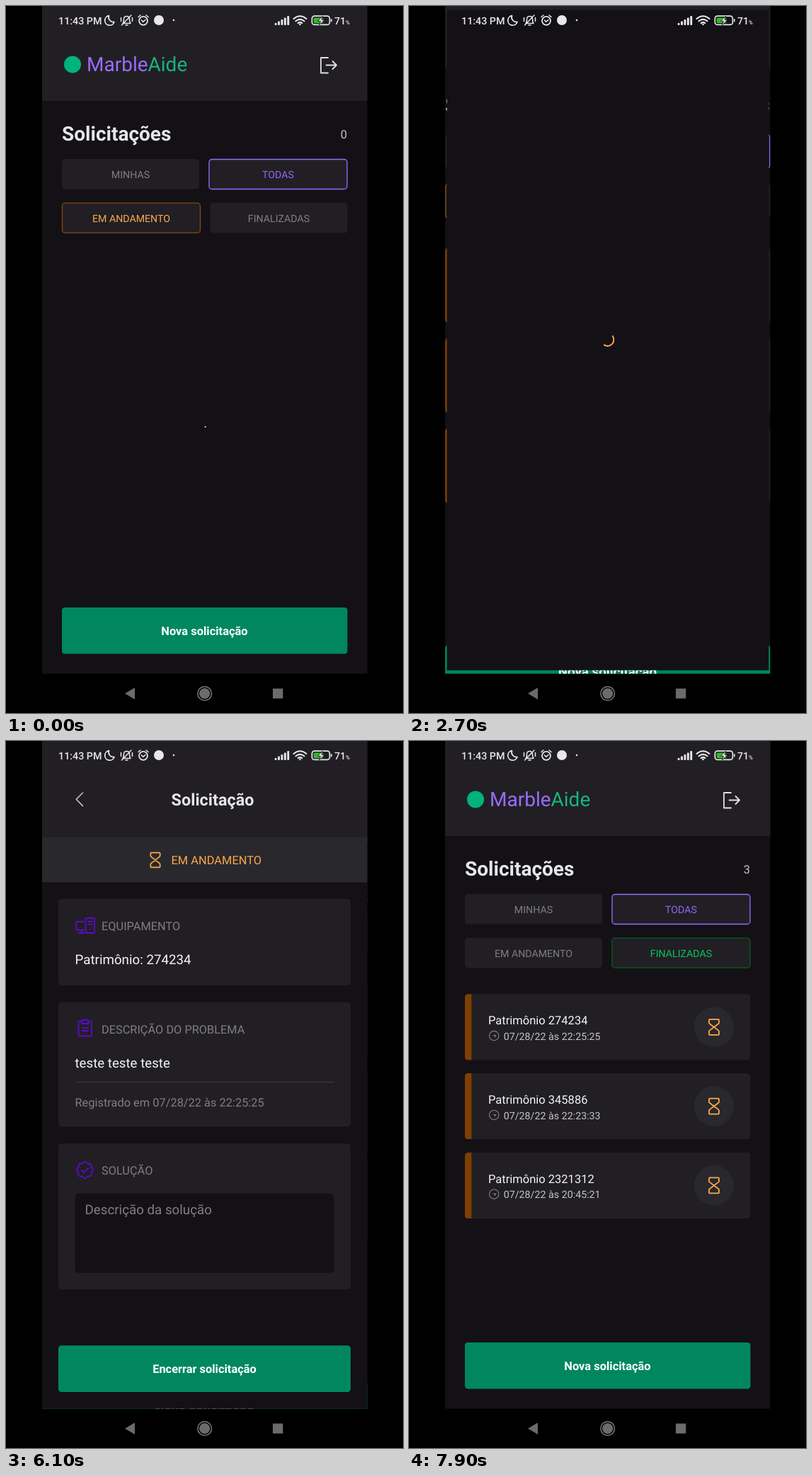
An HTML page for the animation above (8 s loop, 561 px wide and 998 px high).

```html
<!DOCTYPE html>
<html lang="pt-BR">
<head>
<meta charset="utf-8">
<title>Solicitações</title>
<style>
  html, body { margin: 0; width: 100%; height: 100%; overflow: hidden; background: #000; }
  svg { display: block; width: 100vw; height: 100vh; font-family: Roboto, sans-serif; text-rendering: geometricPrecision; }
  .line { fill: none; stroke-linecap: round; stroke-linejoin: round; }
  .bold { font-weight: 700; }
  .mid { text-anchor: middle; }
  .end { text-anchor: end; }
</style>
</head>
<body>
<svg viewBox="0 0 561 998" id="stage"></svg>
<script>
const BG = '#131115', PANEL = '#211f24', RAISED = '#29282d', GREEN = '#00875f',
  ORANGE = '#fba94c', RUST = '#803e02', GRAY = '#7f7e84', LIGHT = '#c4c4cc', WHITE = '#f4f4f6',
  VIOLET = '#996dff', PURPLE = '#5c0acb';

const rect = (x, y, w, h, fill, r = 4.5, more = '') =>
  `<rect x="${x}" y="${y}" width="${w}" height="${h}" rx="${r}" fill="${fill}" ${more}/>`;
const text = (x, y, size, fill, str, cls = '') =>
  `<text x="${x}" y="${y}" font-size="${size}" fill="${fill}" class="${cls}">${str}</text>`;
const line = (d, stroke, width, more = '') =>
  `<path class="line" d="${d}" stroke="${stroke}" stroke-width="${width}" ${more}/>`;
const disc = (x, y, r, fill, more = '') => `<circle cx="${x}" cy="${y}" r="${r}" fill="${fill}" ${more}/>`;
const ring = (x, y, r, stroke, width) => disc(x, y, r, 'none', `stroke="${stroke}" stroke-width="${width}"`);

const hourglass = (x, y, s = 1) =>
  line('M-6 -11H6Q7 -11 7 -10V-6.2Q7 -5.4 6.3 -4.8L-6.3 4.8Q-7 5.4 -7 6.2V10Q-7 11 -6 11H6Q7 11 7 10V6.2Q7 5.4 6.3 4.8L-6.3 -4.8Q-7 -5.4 -7 -6.2V-10Q-7 -11 -6 -11Z',
    ORANGE, 1.8, `transform="translate(${x} ${y}) scale(${s})"`);

const spinner = (id, y) => `<circle id="${id}" cx="280.5" cy="${y}" r="9" pathLength="1" fill="none"
  stroke="${ORANGE}" stroke-width="2" stroke-linecap="square"/>`;

// Selected filters are slightly wider because of their border.
function filter(column, y, label, border, color) {
  const x = column ? (border ? 286.5 : 288.5) : 79;
  const w = border ? 196 : 194;
  const box = border
    ? rect(x + .5, y + .5, w - 1, 42, PANEL, 4, `stroke="${border}" stroke-width="1.3"`)
    : rect(x, y, w, 42.5, PANEL);
  return box + text(x + w / 2, y + 26.8, 14.2, color || GRAY, label, 'mid');
}

function card(name, date, i) {
  return `<g transform="translate(0 ${357.3 + i * 111.8})">
    ${rect(79, 0, 403.5, 93, PANEL)}
    <path d="M88.3 0H83.5Q79 0 79 4.5V88.5Q79 93 83.5 93H88.3Z" fill="${RUST}"/>
    ${text(112, 42.8, 16.5, WHITE, 'Patrimônio ' + name)}
    ${ring(120.2, 58.8, 6.7, GRAY, 1.1)}
    <path d="M117.5 57.8h6l-2 3.6-1-2.4z" fill="${GRAY}"/>
    ${text(133.7, 64.6, 14.25, LIGHT, date)}
    ${disc(431, 46.5, 28.2, RAISED)}${hourglass(431, 46.5)}</g>`;
}

const home = rect(-20, -60, 600, 1100, BG, 0) + rect(51, 0, 460, 134, PANEL, 0) +
  disc(94, 82.5, 12, '#00b37e') +
  text(114, 91.5, 28, VIOLET, 'Marble<tspan fill="#18b47c">Aide</tspan>') +
  line('M455 73H445V94.5H455M452.5 83.5H467M461.5 78L467 83.5L461.5 89', '#e1e1e6', 1.8) +
  text(79, 190.4, 28, '#e6e6ea', 'Solicitações', 'bold') +
  `<text id="count" class="end" x="482" y="187" font-size="16.4" fill="${LIGHT}"></text>` +
  filter(0, 216, 'MINHAS') + filter(1, 216, 'TODAS', VIOLET, '#9167f2') +
  `<g id="open">${filter(0, 277.7, 'EM ANDAMENTO', '#8a4a10', ORANGE)}${filter(1, 277.7, 'FINALIZADAS')}</g>
   <g id="closed">${filter(0, 277.7, 'EM ANDAMENTO')}${filter(1, 277.7, 'FINALIZADAS', '#06601f', '#08c45c')}</g>
   <g id="list">${[
    ['274234', '07/28/22 às 22:25:25'],
    ['345886', '07/28/22 às 22:23:33'],
    ['2321312', '07/28/22 às 20:45:21']
  ].map((c, i) => card(...c, i)).join('')}</g>` +
  spinner('listSpin', 603) +
  rect(79, 849, 403.5, 65.5, GREEN) +
  text(280.5, 888, 16.45, '#fff', 'Nova solicitação', 'bold mid');

const seal = Array.from({ length: 65 }, (_, i) => {
  const a = i / 64 * 2 * Math.PI, r = 10.8 + .9 * Math.cos(8 * a);
  return (111.5 + r * Math.cos(a)).toFixed(1) + ' ' + (605.5 + r * Math.sin(a)).toFixed(1);
}).join('L');

const detail = rect(51, 0, 460, 943, BG, 0) + spinner('pageSpin', 471) + `<g id="page">` +
  rect(51, 0, 460, 136, PANEL, 0) +
  line('M108.5 73L99.3 82.3L108.5 91.6', LIGHT, 1.6) +
  text(292, 90.5, 23.4, '#e6e6ea', 'Solicitação', 'bold mid') +
  rect(51, 136, 460, 63.5, RAISED, 0) + hourglass(211, 168, .95) +
  text(233.5, 174, 16.45, ORANGE, 'EM ANDAMENTO') +
  rect(74, 223, 413, 122, PANEL) + rect(74, 368.7, 413, 175.8, PANEL) + rect(74, 568.3, 413, 206, PANEL) +
  line('M110 255H100.5Q99 255 99 256.5V265.5Q99 267 100.5 267H110M103 271H110M107 267V271M114 250H123.5Q125 250 125 251.5V269.5Q125 271 123.5 271H114Q112.5 271 112.5 269.5V251.5Q112.5 250 114 250ZM116 255H121.5M116 259H121.5M118.7 266V266.1', PURPLE, 1.8) +
  line('M107.5 395.5H104Q102.5 395.5 102.5 397V415Q102.5 416.5 104 416.5H119.5Q121 416.5 121 415V397Q121 395.5 119.5 395.5H116M107 399V397Q107 393.5 111.7 393.5Q116.5 393.5 116.5 397V399ZM107.5 405H116M107.5 409H116', PURPLE, 1.8) +
  line(`M${seal}ZM107 606L110 609L116.5 602.8`, PURPLE, 1.8) +
  text(135, 267.3, 16.35, GRAY, 'EQUIPAMENTO') +
  text(97.5, 315, 18.75, WHITE, 'Patrimônio: 274234') +
  text(135, 412.8, 16.35, GRAY, 'DESCRIÇÃO DO PROBLEMA') +
  text(97.5, 460.5, 18.7, WHITE, 'teste teste teste') +
  rect(97.5, 481, 366.5, 1.1, '#3a393f', 0) +
  text(97.5, 515.5, 16.4, GRAY, 'Registrado em 07/28/22 às 22:25:25') +
  text(135, 612.3, 16.35, GRAY, 'SOLUÇÃO') +
  rect(97.5, 638.7, 366, 112, BG) +
  text(111.5, 668, 18.75, GRAY, 'Descrição da solução') +
  rect(74, 853.3, 413, 65.7, GREEN) +
  text(280.5, 892.3, 16.4, '#fff', 'Encerrar solicitação', 'bold mid') + '</g>';

const INK = '#e8e8e8';
const statusBar = `<g font-weight="500">${text(74, 25.5, 14.3, INK, '11:43 PM')}
  ${text(464, 25.5, 14.2, INK, '71')}${text(480, 25.5, 8, INK, '%')}</g>` +
  line('M145.5 13.7A6.8 6.8 0 1 0 153 22.5A6.6 6.6 0 0 1 145.5 13.7Z', INK, 1.7) +
  line('M165 24.5Q166.5 23 166.5 18.5Q166.5 14.5 170.5 14.5Q174.5 14.5 174.5 18.5Q174.5 23 176 24.5ZM169 27H172M163.5 27L177 13M162.5 16.5V21.5M178.5 16.5V21.5', INK, 1.5) +
  ring(194, 20.8, 6, INK, 1.8) + line('M187 15.5L190 13M201 15.5L198 13M191.5 20L193.7 22.3L197 19.5', INK, 1.6) +
  disc(216, 20, 7, INK) + disc(237, 20, 1.3, INK) +
  [3, 5.5, 8, 10.5, 13].map((h, i) => rect(379.7 + i * 4.4, 27 - h, 2.9, h, INK, 1)).join('') +
  line('M406.5 18Q415.5 10.5 424.5 18M409.5 21.3Q415.5 16.5 421.5 21.3M412.7 24.2Q415.5 22 418.3 24.2', INK, 2.1) +
  disc(415.5, 26, 1.3, INK) +
  rect(432.4, 14.2, 25, 12.2, 'none', 3.5, `stroke="${INK}" stroke-width="1.7"`) +
  rect(434.7, 16.4, 13.5, 7.8, '#35b52b', 1.5) + rect(459, 18, 1.6, 4.5, INK, .8) +
  `<path d="M447.5 14L440.5 21.3H444.5L442.5 27L450 19.4H446Z" fill="${INK}" stroke="${BG}" stroke-width=".8"/>`;

const navBar = `<path d="M168 970.5L182 962.3V978.7Z" fill="#6b6b6b"/>` +
  disc(280.7, 970.5, 7.6, '#6b6b6b') + ring(280.7, 970.5, 9.8, '#7a7a7a', 1.5) +
  rect(377, 963.5, 14.3, 14, '#6b6b6b', 0);

document.getElementById('stage').innerHTML =
  `<clipPath id="app"><rect x="51" width="459.5" height="942.5"/></clipPath>
   <g clip-path="url(#app)"><g id="home">${home}</g><g id="detail">${detail}</g></g>${statusBar}${navBar}`;

const $ = id => document.getElementById(id);
const clamp = v => Math.min(1, Math.max(0, v));
const show = (id, on) => $(id).setAttribute('display', on ? 'inline' : 'none');

// y at x on a cubic Bézier given by its x and y control values.
function bezier(x, xs, ys) {
  const at = ([a, b, c, d], s) => {
    const r = 1 - s;
    return a * r * r * r + 3 * b * s * r * r + 3 * c * s * s * r + d * s * s * s;
  };
  let lo = 0, hi = 1;
  for (let i = 0; i < 24; i++) {
    const m = (lo + hi) / 2;
    if (at(xs, m) < x) lo = m; else hi = m;
  }
  return at(ys, lo);
}
const standard = v => bezier(clamp(v), [0, .4, .2, 1], [0, 0, 1, 1]);
const emphasized = v => v <= 0 ? 0 : v >= 1 ? 1 : v < 1 / 6
  ? bezier(v, [0, .05, .13333, 1 / 6], [0, 0, .06, .4])
  : bezier(v, [1 / 6, .20833, .25, 1], [.4, .82, 1, 1]);

function spin(id, age) {
  const u = Math.max(0, age) / 1333, p = u % 1;
  const head = .75 * standard(p * 2), tail = .75 * standard(p * 2 - 1);
  const el = $(id), angle = 360 * (tail + p / 4) + age * 720 / 4444 - 90;
  el.setAttribute('stroke-dasharray', `${Math.max(.003, head - tail)} 1`);
  el.setAttribute('transform', `rotate(${angle} 280.5 ${el.getAttribute('cy')})`);
}

const zoom = (id, s) =>
  $(id).setAttribute('transform', `translate(280.5 471.3) scale(${s}) translate(-280.5 -471.3)`);

const LOADED = 400, PUSH = 2530, READY = 3400, POP = 6176, SWITCH = 7900, MOVE = 400;

function draw(t) {
  const loaded = t >= LOADED, back = t >= POP;
  $('count').textContent = loaded ? 3 : 0;
  show('list', loaded);
  show('listSpin', !loaded);
  spin('listSpin', t + 30);
  show('open', t < SWITCH);
  show('closed', t >= SWITCH);

  const e = emphasized((t - (back ? POP : PUSH)) / MOVE);
  const depth = back ? 1 - e : e;
  zoom('home', 1 + .15 * depth);
  zoom('detail', .85 + .15 * depth);
  const alpha = back ? 1 - clamp((t - POP - 35) / 83) : clamp((t - PUSH - 80) / 83);
  $('detail').setAttribute('opacity', alpha);
  show('detail', alpha > 0);
  show('page', t >= READY);
  show('pageSpin', t < READY);
  spin('pageSpin', t - 2450);
}

function tick() {
  draw(performance.now() % 8000);
  requestAnimationFrame(tick);
}
tick();
</script>
</body>
</html>
```
